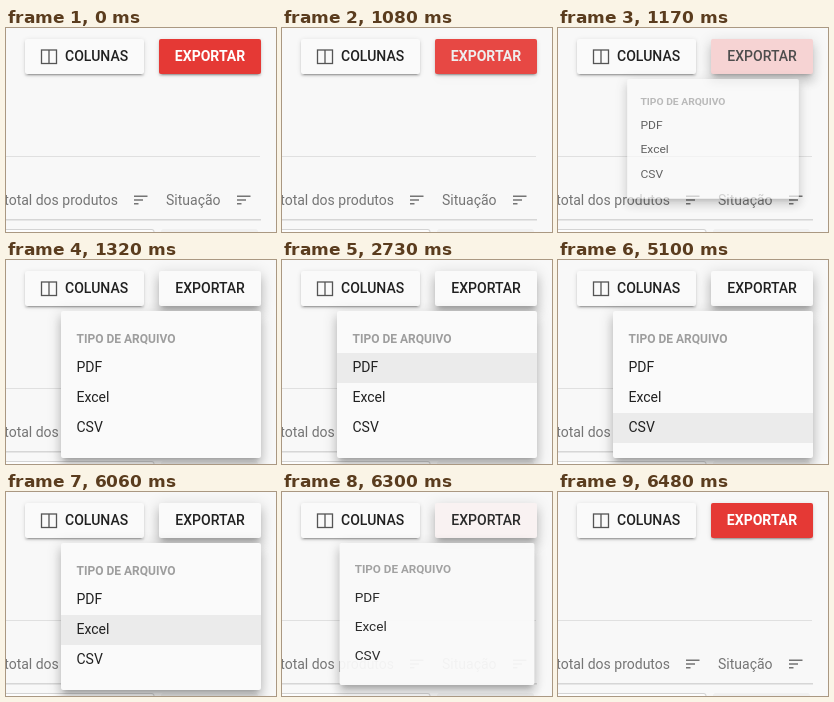
These frames come from a looping animation (270x204 px, 6960 ms). An HTML page with a canvas:

```html
<!DOCTYPE html>
<html lang="pt">
<head>
<meta charset="utf-8">
<title>Exportar</title>
<style>
html, body { margin: 0; width: 100%; height: 100%; overflow: hidden; background: #f8f8f8; }
canvas { display: block; width: 270px; height: 204px; }
</style>
</head>
<body>
<canvas id="stage"></canvas>
<script>
const W = 270, H = 204, LOOP = 6960, STEP = 30;
const DPR = window.devicePixelRatio || 1;
const FONT = 'Roboto, "Open Sans", sans-serif';
const INK = '#212121', PAPER = '#fafafa', GREY = '#757575';
const RED = [229, 57, 53], LIGHT = [250, 250, 250], WHITE = [255, 255, 255], DARK = [33, 33, 33];

// Elevation layers: offset y, blur, spread, alpha
const LOW = [[3, 1, -2, .2], [2, 2, 0, .14], [1, 5, 0, .12]];
const HIGH = [[5, 5, -3, .2], [8, 10, 1, .14], [3, 14, 2, .12]];

const MENU = { x: 55, y: 51, w: 200, h: 147 };
const ITEMS = ['PDF', 'Excel', 'CSV'];
const ROW_TOP = 93, ROW_H = 30;
const HOVERS = [[2730, 3840, 0], [3840, 5100, 1], [5100, 6060, 2], [6060, 6090, 1]];

function setup(canvas) {
  canvas.width = Math.round(W * DPR);
  canvas.height = Math.round(H * DPR);
  return canvas.getContext('2d');
}
const ctx = setup(document.getElementById('stage'));
const layer = setup(document.createElement('canvas'));

const clamp = v => Math.max(0, Math.min(1, v));
const mix = (a, b, p) => `rgb(${a.map((v, i) => Math.round(v + (b[i] - v) * p)).join(',')})`;

// cubic-bezier(.4, 0, .2, 1)
function ease(x) {
  if (x <= 0) return 0;
  if (x >= 1) return 1;
  let lo = 0, hi = 1, s = .5;
  for (let i = 0; i < 24; i++) {
    s = (lo + hi) / 2;
    const r = 1 - s;
    if (1.2 * r * r * s + .6 * r * s * s + s * s * s < x) lo = s; else hi = s;
  }
  return s * s * (3 - 2 * s);
}
const ramp = (t, start, length) => ease((t - start) / length);

function text(c, str, x, y, color, { weight = 400, size = 14, align = 'left' } = {}) {
  c.font = `${weight} ${size}px ${FONT}`;
  c.textAlign = align;
  c.fillStyle = color;
  c.fillText(str, x, y);
}

function box(c, x, y, w, h, r, color) {
  c.beginPath();
  c.roundRect(x, y, w, h, r);
  c.fillStyle = color;
  c.fill();
}

// The shape stays outside the stage; only its shadow lands inside.
function shadow(c, x, y, w, h, layers, strength) {
  if (strength <= 0) return;
  const away = 600, m = c.getTransform();
  c.save();
  for (const [dy, blur, spread, alpha] of layers) {
    c.shadowColor = `rgba(0,0,0,${alpha * strength})`;
    c.shadowBlur = blur * DPR;
    c.shadowOffsetX = away * m.a;
    c.shadowOffsetY = dy * m.d;
    box(c, x - away - spread, y - spread, w + 2 * spread, h + 2 * spread, 2, '#000');
  }
  c.restore();
}

function sortIcon(x) {
  ctx.fillStyle = GREY;
  [13.5, 9, 4.5].forEach((w, i) => ctx.fillRect(x, 167.5 + i * 3.75, w, 1.5));
}

function drawTable() {
  ctx.fillStyle = '#e0e0e0';
  ctx.fillRect(0, 128, 254, 1);
  ctx.fillStyle = '#d6d6d6';
  ctx.fillRect(0, 191, 255, 1.5);

  text(ctx, 'total dos produtos', 112, 177, GREY, { align: 'right' });
  sortIcon(128);
  text(ctx, 'Situação', 160, 177, GREY);
  sortIcon(231);

  box(ctx, -10, 201, 158.5, 20, 3, '#d4d4d4');
  box(ctx, -10, 202, 157.5, 20, 2, '#fdfdfd');
  box(ctx, 155, 201, 97, 20, 3, '#f0f0f0');
}

function drawColumnsButton() {
  shadow(ctx, 19, 11, 119, 35, LOW, 1);
  box(ctx, 19, 11, 119, 35, 2, PAPER);
  ctx.strokeStyle = '#555';
  ctx.lineWidth = 1.3;
  ctx.strokeRect(35.5, 22, 15, 13.5);
  ctx.beginPath();
  ctx.moveTo(43, 22);
  ctx.lineTo(43, 35.5);
  ctx.stroke();
  text(ctx, 'COLUNAS', 59, 33, INK, { weight: 500 });
}

function drawExportButton(p) {
  shadow(ctx, 153, 11, 102, 35, LOW, 1 - p);
  shadow(ctx, 153, 11, 102, 35, HIGH, p);
  box(ctx, 153, 11, 102, 35, 2, mix(RED, LIGHT, p));
  text(ctx, 'EXPORTAR', 204, 33, mix(WHITE, DARK, p), { weight: p < .3 ? 700 : 500, align: 'center' });
}

function drawMenu(p, hover) {
  if (p <= 0) return;
  const { x, y, w, h } = MENU, c = layer;
  const sx = 1 - .28 * (1 - p), sy = 1 - .367 * (1 - p);
  c.setTransform(1, 0, 0, 1, 0, 0);
  c.clearRect(0, 0, c.canvas.width, c.canvas.height);
  c.scale(DPR, DPR);
  c.translate(x + w / 2, y);
  c.scale(sx, sy);
  c.translate(-x - w / 2, -y);

  shadow(c, x, y, w, h, HIGH, 1);
  box(c, x, y, w, h, 2, PAPER);
  if (hover >= 0) {
    c.fillStyle = '#ebebeb';
    c.fillRect(x, ROW_TOP + hover * ROW_H, w, ROW_H);
  }
  text(c, 'TIPO DE ARQUIVO', 70.5, 82.5, '#9e9e9e', { weight: 700, size: 12 });
  ITEMS.forEach((item, i) => text(c, item, 70.5, 112 + i * ROW_H, INK));

  ctx.globalAlpha = clamp(p < .5 ? p * 1.4 : 1 - (1 - p) * 1.4 + .4 * (1 - clamp((p - .5) * 2)));
  ctx.drawImage(c.canvas, 0, 0, W, H);
  ctx.globalAlpha = 1;
}

function draw(t) {
  const closing = t >= 6270;
  const button = closing ? 1 - ramp(t, 6275, 205) : ramp(t, 1040, 250);
  const menu = closing ? 1 - ramp(t, 6263, 215) : ramp(t, 1090, 230);
  const active = HOVERS.find(([from, to]) => t >= from && t < to);

  ctx.setTransform(DPR, 0, 0, DPR, 0, 0);
  ctx.fillStyle = '#f8f8f8';
  ctx.fillRect(0, 0, W, H);
  drawTable();
  drawColumnsButton();
  drawExportButton(button);
  drawMenu(menu, active ? active[2] : -1);
}

const begin = performance.now();
function tick() {
  const t = (performance.now() - begin) % LOOP;
  draw(Math.floor(t / STEP) * STEP);
  requestAnimationFrame(tick);
}
tick();
</script>
</body>
</html>
```
